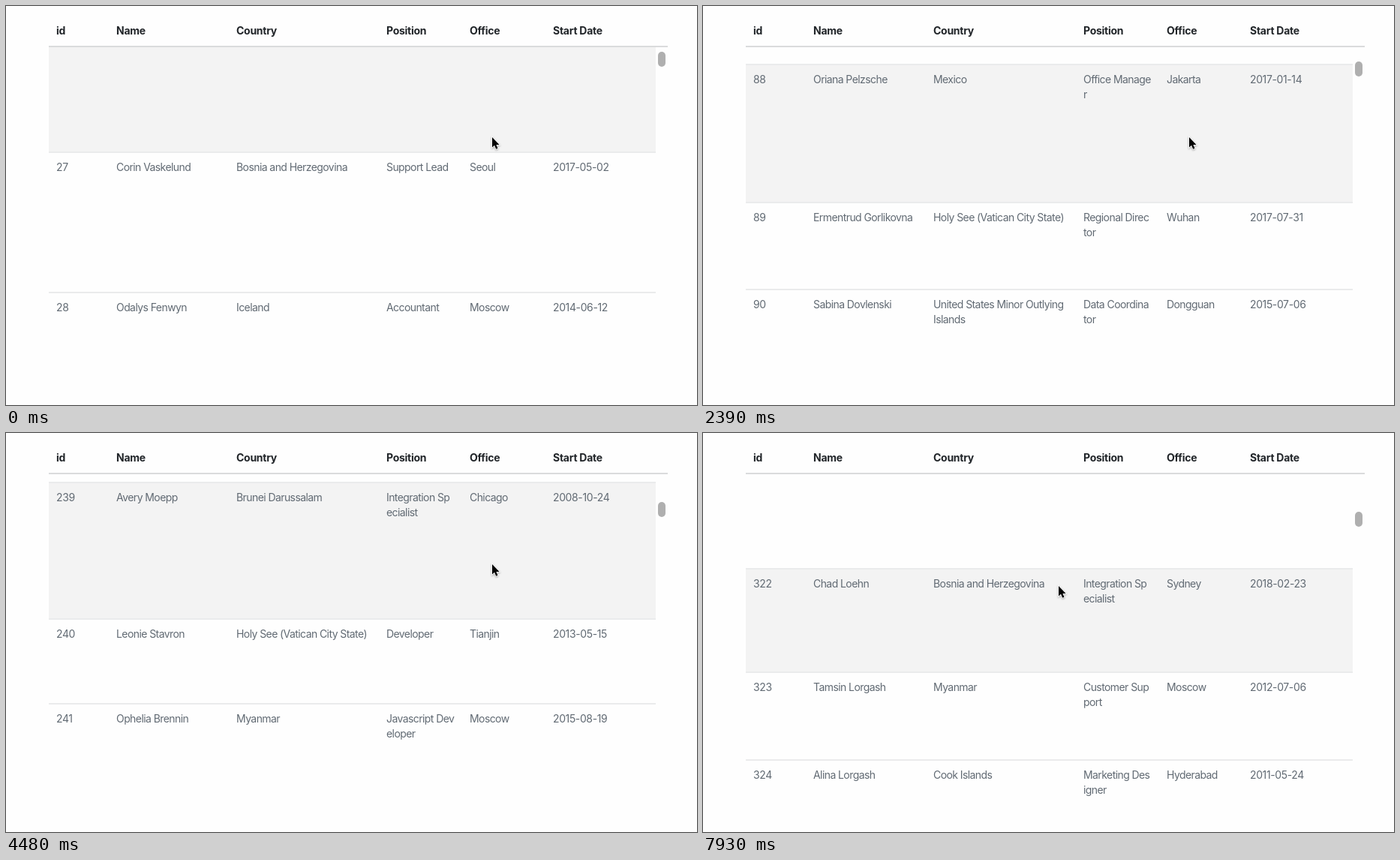
An HTML page for the animation above (8 s loop, 921 by 532 pixels).

```html
<!DOCTYPE html>
<html lang="en">
<head>
<meta charset="utf-8">
<title>Scrolling table</title>
<style>
html, body { margin: 0; width: 100%; height: 100%; overflow: hidden; background: #fefefe; }
body { position: relative; font: 14px/20px Inter, Roboto, sans-serif; letter-spacing: -0.58px; color: #616a73; }
.head { position: absolute; left: 57px; top: 0; width: 825px; height: 53px; border-bottom: 2px solid #dadbdc; color: #212529; font-weight: 700; letter-spacing: -0.27px; }
.head span { top: 23px; }
.view { position: absolute; left: 57px; top: 55px; width: 809px; height: 477px; overflow: hidden; }
.row { position: absolute; left: 0; top: 0; width: 809px; box-sizing: border-box; border-top: 2px solid #eaebec; }
.row.hover { background: #f3f3f3; }
span { position: absolute; top: 9px; white-space: pre; }
.row span:first-child, .row span:last-child { letter-spacing: -0.38px; }
.thumb { position: absolute; left: 869px; top: 0; width: 10px; height: 20px; border-radius: 5px; background: #afafaf; }
.mouse { position: absolute; left: 0; top: 0; overflow: visible; filter: drop-shadow(0 1px 1px #0005); }
</style>
</head>
<body>
<div class="head"></div>
<div class="view"></div>
<div class="thumb"></div>
<svg class="mouse" width="12" height="18"><path d="M0 0V13.6L3 10.8L5.2 15.8L7.5 14.8L5.4 10H9.6Z" fill="#000" stroke="#fff" stroke-width="1.6" paint-order="stroke"/></svg>
<script>
const $ = s => document.querySelector(s);
const cols = [10, 90, 250, 450, 561, 672];
const firstId = 18, lastId = 330, duration = 8000;

const first = 'Orla Bram Celia Dorian Elvin Farrah Garnet Hollis Ivo Jessamy Kester Lorna Mabel Nolan Petra Quinn'.split(' ');
const last = 'Ardley Brunnow Caskell Dremmer Elverin Forlund Grantov Hesslow Ivarsen Kordell Lundrey Morvath Nessler'.split(' ');
const countries = ['Mexico', 'Brazil', 'Myanmar', 'Belgium', 'Iceland', 'Maldives', 'Cyprus', 'Cook Islands',
  'Brunei Darussalam', 'Bosnia and Herzegovina', 'Holy See (Vatican City State)', 'United States Minor Outlying|Islands'];
const jobs = ['Support Lead', 'Accountant', 'Javascript Dev|eloper', 'Team Leader', 'Office Manage|r', 'Regional Direc|tor',
  'Data Coordina|tor', 'Sales Assistan|t', 'Development|Lead', 'System Archit|ect', 'Integration Sp|ecialist', 'Developer',
  'Support Engin|eer', 'Customer Sup|port', 'Marketing Des|igner'];
const offices = ['Seoul', 'Moscow', 'Phoenix', 'Wuhan', 'Singapore', 'Jakarta', 'Dongguan', 'Khartoum', 'San Paulo',
  'Chicago', 'Tianjin', 'Sydney', 'Hyderabad'];

// id: height, name, country, job, office, date
const known = {
  26: [200],
  27: [187, 'Corin Vaskelund', 9, 0, 0, '2017-05-02'],
  28: [160, 'Odalys Fenwyn', 4, 1, 1, '2014-06-12'],
  56: [150],
  57: [219, 'Floyd Tarn', 5, 2, 2, '2006-12-19'],
  58: [178, 'Hester Sprowle', 2, 3, 3, '2015-10-22'],
  59: [150, 'Malachiah Virren', 6, 2, 4, '2007-11-12'],
  88: [184, 'Oriana Pelzsche', 0, 4, 5, '2017-01-14'],
  89: [116, 'Ermentrud Gorlikovna', 10, 5, 3, '2017-07-31'],
  90: [160, 'Sabina Dovlenski', 11, 6, 6, '2015-07-06'],
  115: [158, 'Dayton Pirn', 0, 7, 0, '2018-08-14'],
  116: [188, 'Leopold Raynott', 1, 8, 4, '2016-03-17'],
  117: [128, 'Josiah Tilbeck', 2, 4, 7, '2012-12-17'],
  118: [150, 'Marianne Dorvey', 2, 9, 8, '2008-09-25'],
  239: [182, 'Avery Moepp', 8, 10, 9, '2008-10-24'],
  240: [113, 'Leonie Stavron', 10, 11, 10, '2013-05-15'],
  241: [180, 'Ophelia Brennin', 2, 2, 1, '2015-08-19'],
  299: [147, 'Cristel Ordaz', 1, 7, 8, '2019-01-29'],
  300: [171, 'Linnet Svanorski', 3, 8, 9, '2012-10-30'],
  301: [131, 'Donnie Webrin', 10, 5, 7, '2019-05-07'],
  302: [150, 'Israel McTorrough', 11, 12, 4, '2016-05-19'],
  321: [244],
  322: [138, 'Chad Loehn', 9, 10, 11, '2018-02-23'],
  323: [117, 'Tamsin Lorgash', 2, 13, 1, '2012-07-06'],
  324: [150, 'Alina Lorgash', 7, 14, 12, '2011-05-24']
};

let seed = 11;
const rand = n => (seed = (seed * 16807) % 2147483647) % n;
const pick = list => list[rand(list.length)];
const two = n => String(n).padStart(2, '0');
const cells = texts => texts.map((s, i) =>
  `<span style="left:${cols[i]}px">${String(s).replace('|', '\n')}</span>`).join('');

$('.head').innerHTML = cells(['id', 'Name', 'Country', 'Position', 'Office', 'Start Date']);

const rows = [], tops = {};
let y = 0;
for (let id = firstId; id <= lastId; id++) {
  const [h = 112 + rand(108), name, c, j, o, date] = known[id] || [];
  const texts = name
    ? [id, name, countries[c], jobs[j], offices[o], date]
    : [id, pick(first) + ' ' + pick(last), pick(countries), pick(jobs), pick(offices),
       `${2005 + rand(15)}-${two(1 + rand(12))}-${two(1 + rand(28))}`];
  const el = document.createElement('div');
  el.className = 'row';
  el.style.height = h + 'px';
  el.innerHTML = cells(texts);
  $('.view').append(el);
  rows.push({ el, top: y, h });
  tops[id] = y;
  y += h;
}

// moments at which the picture changes
const times = [0];
for (let k = 0, t = 450; k < 39; k++) {
  if (k) t += k === 7 || k === 14 ? 140 : 150;
  times.push(t);
}
times.push(7330, 7480, 7780, 7930);

// step, row id, its stage y, thumb y, easing power (negative: ease out)
const keys = [
  [0, 27, 194, 61], [9, 57, 113, 67, 1.4], [14, 88, 77, 74, 1], [20, 116, 190, 79, 1],
  [28, 239, 65, 92, 1], [34, 299, 50, 101, 1], [39, 322, 304, 105, -2],
  [41, 322, 304, 105, 1], [42, 322, 284, 105, 1], [43, 322, 180, 105, 1]
].map(([step, id, at, thumb, pow]) => ({ step, pos: tops[id] - at, thumb, pow }));

// the pointer is hidden late in the scroll and returns when it moves
const mouse = { 40: [610, 214], 41: [540, 238], 42: [498, 222], 43: [474, 204] };
const pointerHidden = step => step > 30 && step < 40;
const mix = (a, b, p) => Math.round(a + (b - a) * p);
const move = (el, x, y) => el.style.transform = `translate(${x}px,${y}px)`;

function show(step) {
  const i = Math.max(1, keys.findIndex(k => k.step >= step));
  const a = keys[i - 1], b = keys[i];
  const lin = (step - a.step) / (b.step - a.step);
  const p = b.pow < 0 ? 1 - (1 - lin) ** -b.pow : lin ** b.pow;
  const pos = mix(a.pos, b.pos, p);
  const [mx, my] = mouse[step] || [648, 175];
  for (const { el, top, h } of rows) {
    const at = top - pos;
    el.style.display = at < 532 && at + h > 55 ? '' : 'none';
    el.classList.toggle('hover', my >= at && my < at + h);
    move(el, 0, at - 55);
  }
  move($('.thumb'), 0, mix(a.thumb, b.thumb, p));
  move($('.mouse'), mx, my);
  $('.mouse').style.visibility = pointerHidden(step) ? 'hidden' : 'visible';
}

const start = performance.now();
let current = -1;
function tick() {
  const t = (performance.now() - start) % duration;
  const step = times.findLastIndex(s => s <= t);
  if (step !== current) show(current = step);
  requestAnimationFrame(tick);
}
tick();
</script>
</body>
</html>
```
